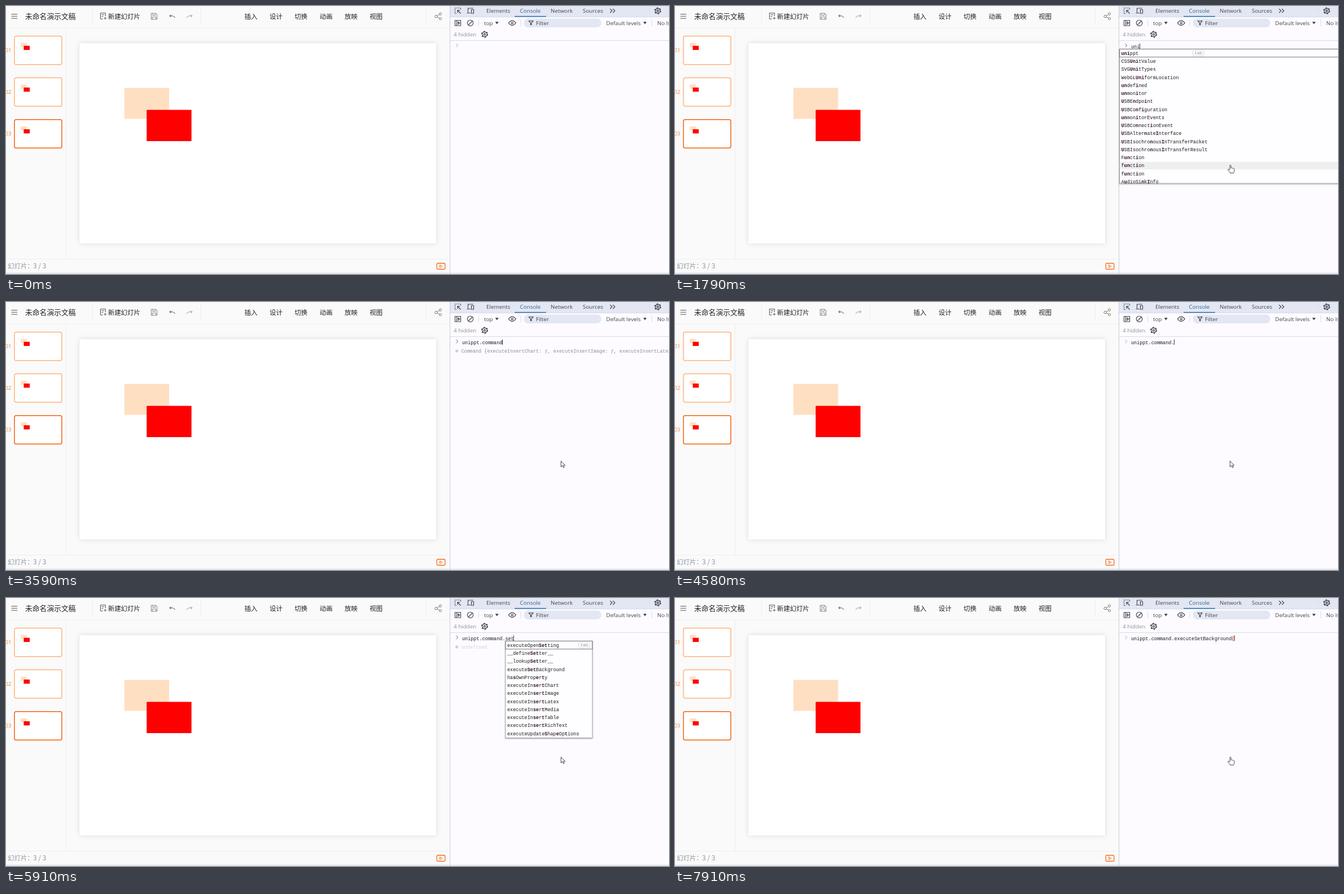
These frames come from a looping animation (1176x476 px, 8 s). An HTML page:

```html
<!DOCTYPE html>
<html lang="zh">
<head>
<meta charset="utf-8">
<style>
html, body { margin: 0; width: 100%; height: 100%; overflow: hidden; background: #fafafa; }
svg { display: block; }
text { white-space: pre; }
.zh { font: 11.5px "Noto Sans CJK SC", "Noto Sans CJK", sans-serif; fill: #222; }
.ui { font: 9.85px "Open Sans", "Noto Sans", sans-serif; fill: #45474d; }
.code { font: 8.5px "Liberation Mono", monospace; fill: #1c1c1c; }
.hit { font-weight: bold; fill: #35102e; }
.line { fill: none; stroke: #555; }
.dark { fill: none; stroke: #44464c; stroke-width: 1.2; }
</style>
</head>
<body>
<svg width="1176" height="476" viewBox="0 0 1176 476">
  <defs>
    <filter id="soft" x="-10%" y="-10%" width="120%" height="120%">
      <feDropShadow dx="0" dy="0" stdDeviation="4" flood-opacity=".13"/>
    </filter>
    <filter id="drop" x="-5%" y="-10%" width="110%" height="125%">
      <feDropShadow dx="0" dy="1" stdDeviation="1" flood-opacity=".35"/>
    </filter>
    <g id="gear" fill="none" stroke="#44464c">
      <circle r="5.2" stroke-width="1.8" stroke-dasharray="2.7 2.745"/>
      <circle r="4.2" stroke-width="1.2"/>
      <circle r="1.5" stroke-width="1.3"/>
    </g>
    <path id="arrow" d="M.5.5v10.4l2.5-2.3 1.7 3.6 1.6-.8-1.7-3.3h3.2z" fill="#fff" stroke="#333" stroke-width=".9"/>
    <path id="hand" d="M.2 8.5V1.6q0-1.1 1-1.1t1 1.1v4q2-.6 2.3.5 1.6-.5 2 .5 1.500-.3 1.500 1.100v3q0 1.800-1.200 3v1H.7v-1l-3.700-4.300q-.8-1.200.2-1.600 1-.3 1.800.7z" fill="#fff" stroke="#333" stroke-width=".9"/>
  </defs>

  <!-- Slide editor -->
  <rect width="788" height="476" fill="#fafafa"/>
  <path d="M0 38.500H788M106.500 39V449M0 449.500H788M153.500 3v32M345.500 3v32M745.500 3v32" class="line" style="stroke:#eeeeee"/>
  <rect x="130.500" y="66" width="632.500" height="355.500" fill="#fff" filter="url(#soft)"/>
  <path d="M210 145.500h79.300v55H210z" fill="#ffdfc2"/>
  <path d="M249.500 184.500H329V240h-79.500z" fill="#f00"/>
  <g id="thumbs"></g>
  <path d="M9.500 14.500h10.500M9.500 18.200h10.500M9.500 22h10.500" class="line"/>
  <text x="34" y="23.300" class="zh" style="font-size:12.8px">未命名演示文稿</text>
  <path d="M176.500 18v-5.500h-9v10.500h4.500M169.500 15.500h5M169.500 18.500h3M176 19.500v4.500M173.800 21.700h4.500" class="line"/>
  <text x="181" y="22.700" class="zh" style="font-size:11.4px">新建幻灯片</text>
  <path d="M257.500 13h8.500l2 2v8.500h-10.500zM260 13v3.500h5V13M259.500 23.500v-4h6.500v4" class="line" stroke-width=".9" style="stroke:#777"/>
  <path d="M299.500 21q-1.500-4.500-9-3.500M292.500 15l-2.500 2.500 3 2" class="line"/>
  <path d="M320.500 21q1.500-4.500 9-3.500M328 15l2.500 2.500-3 2" class="line" style="stroke:#999"/>
  <g id="menu"></g>
  <g class="line" style="stroke:#777"><circle cx="763" cy="18.500" r="2.200"/><circle cx="770.500" cy="14" r="2"/><circle cx="770.500" cy="22.500" r="2"/><path d="M765 17.500l3.700-2.500M765 19.500l3.700 2"/></g>
  <text x="3" y="466" class="zh" style="fill:#8c98a4">幻灯片：</text>
  <text x="48" y="466" class="zh" style="fill:#8c98a4;font-size:12px">3 / 3</text>
  <rect x="764.200" y="457" width="14.500" height="10.500" rx="1.500" fill="none" stroke="#f76b1c" stroke-width="1.300"/>
  <path d="M769.500 459.800l4.300 2.500-4.300 2.500z" fill="none" stroke="#f76b1c"/>

  <!-- Developer tools -->
  <rect x="788" width="388" height="476" fill="#fdfbff"/>
  <rect x="788" width="388" height="19.500" fill="#e3e7f4"/>
  <path d="M788 19.500h388M788 61.500h388M838.500 24v12M913.500 24v12M1145.500 24v12M1141.500 3v11" class="line" style="stroke:#d5dcec"/>
  <path d="M787.500 0v476" class="line" style="stroke:#c5ccdc"/>
  <path d="M0 474.500h1176" class="line" style="stroke:#cfd2d8"/>
  <path d="M902 18.500h56" class="line" style="stroke:#2f6fa8;stroke-width:1.500"/>
  <path d="M806.500 6V3.500h-10v10h3" class="dark" stroke-dasharray="1.700 1.200"/>
  <path d="M801 7.500l5.500 6M801 12V7.500h4.500" class="dark"/>
  <path d="M829 4h-9.500v7.500M817.500 12.500h6.500M825.500 6.500h4v6.500h-4z" class="dark"/>
  <path d="M1071.500 5l3.500 3.500-3.500 3.500M1076.500 5l3.500 3.500-3.500 3.500" class="dark"/>
  <use href="#gear" x="1156" y="8.500"/><use href="#gear" x="849" y="50.300"/>
  <path d="M796.500 25.500h10v9.500h-10zM799.500 25.500V35M802 28l2.800 2.200-2.800 2.200z" class="dark"/>
  <circle cx="823.500" cy="30.200" r="5.200" class="dark"/><path d="M820 34l7.300-7.500" class="dark"/>
  <path d="M891.500 30.200q6.300-8.500 12.700 0-6.400 8.500-12.700 0z" class="dark"/><circle cx="897.800" cy="30.200" r="1.700" class="dark"/>
  <rect x="918.500" y="22.300" width="137.500" height="15.700" rx="7.850" fill="#e3e7f3"/>
  <path d="M927.500 26.500h7.500l-3 3.700v3.300h-1.500v-3.300z" class="dark" stroke-width="1"/>
  <path d="M867.800 28h6l-3 4.500zM1130.300 28h6l-3 4.500z" fill="#45474d"/>
  <g id="labels"></g>
  <g id="console"></g>
  <use id="pointer"/>
</svg>
<script>
const $ = id => document.getElementById(id);
const CHAR = 5.1, LEFT = 809, ROW = 14.25, LOOP = 8000;
const label = (x, y, s, cls, style = '') => `<text x="${x}" y="${y}" class="${cls}" style="${style}">${s}</text>`;
const box = (x, y, w, h, attrs) => `<rect x="${x}" y="${y}" width="${w}" height="${h}" ${attrs}/>`;

$('menu').innerHTML = ['插入', '设计', '切换', '动画', '放映', '视图']
  .map((s, i) => label(423 + i * 44.4, 22.8, s, 'zh')).join('');
$('thumbs').innerHTML = [0, 1, 2].map(i => {
  const y = 53.5 + i * 74.1;
  return label(-1.5, y + 28.7, '0' + (i + 1), 'ui', 'fill:#f0803c;font-size:9.5px') +
    box(15, y, 84, 50.5, `rx="3" fill="#fff" stroke="${i < 2 ? '#ffb27c' : '#f4600f'}" stroke-width="1.5"`) +
    box(26.2, y + 12, 10.600, 7.400, 'fill="#ffdfc2"') + box(31.500, y + 17.200, 10.600, 7.400, 'fill="#f00"');
}).join('');
$('labels').innerHTML = [
  [852, 11.8, 'Elements'], [911.5, 11.8, 'Console', '#2f6590'], [966, 11.8, 'Network'], [1023, 11.8, 'Sources'],
  [848, 33.600, 'top'], [940, 33.600, 'Filter'], [1064.500, 33.600, 'Default levels'], [1155, 33.600, 'No Issues'],
  [794, 53.800, '4 hidden', '#8f9299']
].map(([x, y, s, c = '#45474d']) => label(x, y, s, 'ui', 'fill:' + c)).join('');

const globals = ('unippt CSSUnitValue SVGUnitTypes WebGLUniformLocation undefined unmonitor USBEndpoint ' +
  'USBConfiguration unmonitorEvents USBConnectionEvent USBAlternateInterface USBIsochronousInTransferPacket ' +
  'USBIsochronousInTransferResult Function function function AudioSinkInfo').split(' ');
const members = ('executeOpenSetting __defineSetter__ __lookupSetter__ executeSetBackground hasOwnProperty ' +
  'executeInsertChart executeInsertImage executeInsertLatex executeInsertMedia executeInsertTable ' +
  'executeInsertRichText executeUpdateShapeOptions').split(' ');
const allMembers = [...members, 'constructor', 'isPrototypeOf', 'propertyIsEnumerable', 'toLocaleString', 'toString'];

const APP = 'UniPPT {command: Command, listener: Listener, eventBus: EventBus, register: Register, …}';
const CMD = 'Command {executeInsertChart: ƒ, executeInsertImage: ƒ, executeInsertLatex: ƒ, …}';
const base = 'unippt.command.', full = base + 'executeSetBackground';
const UNDEF = 'undefined';

const pop = (col, rows, query, more) => ({ x: LEFT + .5 + col * CHAR, y: 76.5, w: 154, rows, query, ...more });
const wide = { w: 400, h: 238.500, hover: 14 };
const side = { ...wide, x: 788.500 };
const found = past => pop(0, ['executeSetBackground'], past, { past: base + past });

// Each state: start time, typed text, then what is on besides it.
const states = [
  [0, '', { blink: 1 }],
  [460, '', {}],
  [1060, 'u', { on: 1 }],
  [1390, 'uni', { on: 1 }],
  [1460, 'uni', { on: 1, note: APP, hand: 1, pop: pop(0, globals, 'un', wide) }],
  [1790, 'uni', { on: 1, hand: 1, pop: pop(0, globals, 'uni', side) }],
  [2060, 'uni', { on: 1, hand: 1, blink: 1, pop: pop(0, globals, 'uni', side) }],
  [2260, 'unippt', { on: 1, note: APP }],
  [2850, 'unippt.', { on: 1, note: APP, stale: 1 }],
  [2920, 'unippt.', {}],
  [3260, 'unippt.c', { on: 1, note: CMD, pop: pop(7, ['command'], 'c', { y: 35.500, past: 'unippt.command' }) }],
  [3590, 'unippt.command', { on: 1, note: CMD }],
  [4190, 'unippt.command', { on: 1, note: CMD, blink: 1 }],
  [4580, base, {}],
  [4910, base, { pop: pop(15, allMembers, '', side) }],
  [4980, base, { hand: 1, pop: pop(15, allMembers, '', side) }],
  [5180, base, { hand: 1, blink: 1, pop: pop(15, allMembers, '', side) }],
  [5380, base + 's', { hand: 1, pop: pop(15, allMembers, 's', side) }],
  [5440, base + 's', { on: 1, note: UNDEF, pop: pop(15, members, 's') }],
  [5640, base + 'se', { on: 1, note: UNDEF, stale: 1, pop: pop(15, members, 's') }],
  [5710, base + 'se', { on: 1, note: UNDEF, pop: pop(15, members, 'se') }],
  [5910, base + 'set', { on: 1, note: UNDEF, stale: 1, pop: pop(15, members, 'set') }],
  [5980, base + 'set', { on: 1, note: UNDEF, pop: pop(15, members, 'set', { past: base + 'set' }) }],
  [6190, base + 'setb', { on: 1, note: UNDEF, stale: 1, pop: pop(15, members, 'set', { past: base + 'set' }) }],
  [6260, base + 'setb', { on: 1, note: UNDEF, pop: found('setb') }],
  [6380, base + 'setba', { on: 1, note: UNDEF, pop: found('setba') }],
  [6450, base + 'setbag', { on: 1, note: UNDEF, pop: found('setbag') }],
  [6780, full, { on: 1, note: UNDEF }],
  [7380, full + '(', { note: UNDEF, stale: 1 }],
  [7510, full + '(', {}],
  [7910, full + '(', { hand: 1 }]
];

// Bolds the letters of the query in the order they occur.
function mark(word, query) {
  let k = 0;
  return [...word].map(c => c.toLowerCase() === query[k] ? (k++, `<tspan class="hit">${c}</tspan>`) : c).join('');
}

function popup({ x, y, w, h, rows, query, past, hover }) {
  h ??= (rows.length + (past ? 1 : 0)) * ROW + 1;
  let s = box(x, y, w, h, 'fill="#fefdff" stroke="#a4a4a8" filter="url(#drop)"');
  s += `<svg x="${x}" y="${y}" width="${w}" height="${h}">`;
  if (hover) s += box(0, hover * ROW + .7, w, 13.500, 'fill="#efeff0"');
  s += rows.map((r, i) => label(3, 10.400 + i * ROW, mark(r, query), 'code')).join('');
  if (past) {
    const top = rows.length * ROW;
    s += box(.5, top + .8, w - 1, 13.500, 'fill="#f3f1f6"') +
      `<path d="M5 ${top + 5}l2.500 2.700-2.500 2.700" class="line" style="stroke:#888"/>` +
      label(29.500, top + 10.700, past, 'code hit', 'font-size:9.5px;font-weight:bold');
  }
  s += box(130, 2.700, 19.500, 9.300, 'rx="1.500" fill="#fff" stroke="#ccc" stroke-width=".8"') +
    label(133, 9.800, 'tab', 'code', 'font-size:7.5px;fill:#8a8a8a');
  return s + '</svg>' + box(x, y, w, ROW, 'fill="none" stroke="#747478"');
}

function draw([, text, o]) {
  const end = LEFT + text.length * CHAR;
  let s = `<path d="M798.500 67l3.300 3-3.300 3" class="line" style="stroke:${o.on ? '#56647e' : '#a5a8ae'}"/>`;
  if (text.endsWith('(')) s += box(end - CHAR, 66.500, CHAR, 9.500, 'fill="#f8dfdc"');
  s += label(LEFT, 74.700, text.replace('(', '<tspan fill="#a02020">(</tspan>'), 'code');
  if (!o.blink) s += box(Math.floor(end), 66.500, .9, 9.500, 'fill="#222"');
  if (o.note) {
    s += '<path d="M800.500 84l-3 3 3 3M798 87h5" class="line" style="stroke:#a0a3aa"/>' +
      label(807.500, 89.800, o.note, 'code', `fill:${o.stale ? '#d2d2d6' : '#8d8d93'}`);
  }
  if (o.pop) s += popup(o.pop);
  $('console').innerHTML = s;
}

function movePointer(t, hand) {
  const p = $('pointer'), u = Math.min(1, Math.floor((t - 120) / 85) / 4), left = (1 - u) ** 2;
  p.style.display = t < 120 ? 'none' : '';
  p.setAttribute('href', hand ? '#hand' : '#arrow');
  p.setAttribute('transform', `translate(${984 + 117 * left} ${282 + 137 * left})`);
}

let shown;
function frame(now) {
  const t = now % LOOP, state = states.findLast(s => s[0] <= t);
  if (state !== shown) draw(shown = state);
  movePointer(t, state[2].hand);
  requestAnimationFrame(frame);
}
const start = performance.now();
requestAnimationFrame(function tick() {
  frame(Math.max(0, performance.now() - start));
});
</script>
</body>
</html>
```
